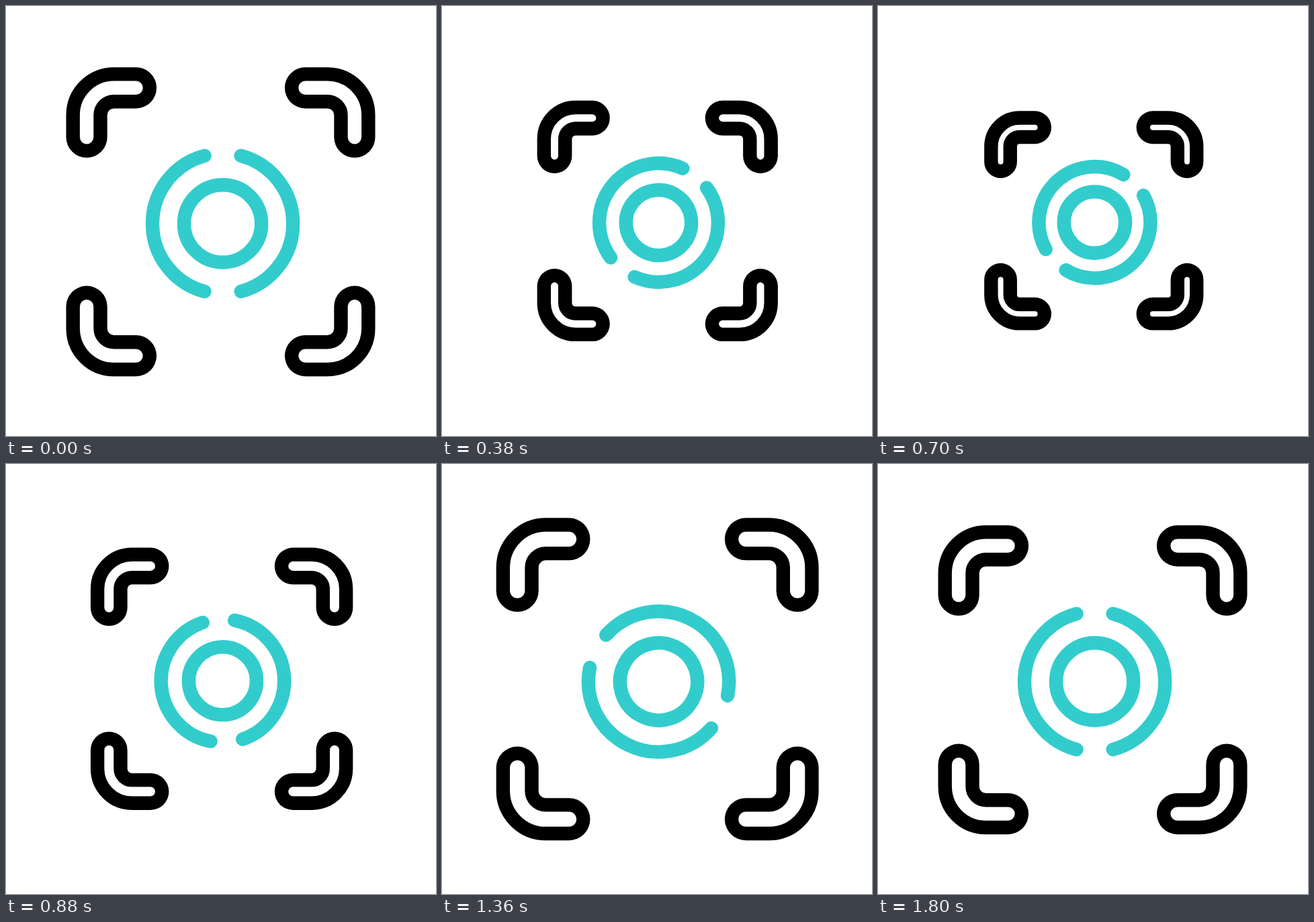
An HTML page that plays this animation: 640x640 px, repeating every 2.02 s.

```html
<!DOCTYPE html>
<html lang="en">
<head>
<meta charset="utf-8">
<title>Focus</title>
<style>
  html, body { margin: 0; width: 100%; height: 100%; overflow: hidden; background: #fff; }
  svg { display: block; width: 100%; height: 100%; }
  path, circle { fill: none; stroke-linecap: round; }
  #edge { stroke: #000; }
  #core { stroke: #fff; }
  #lens { stroke: #33cccc; stroke-width: 20.4; }
</style>
</head>
<body>
<svg viewBox="0 0 640 640">
  <path id="edge"/>
  <path id="core"/>
  <g id="lens">
    <circle id="ring"/>
    <path id="arcs"/>
  </g>
</svg>
<script>
const LOOP = 2020, STEP = 20, PHASE = 600, LINE = 20.4;

// Poses at 0, 600, 1200 and 1800 ms, eased in and out between them
const KEYS = {
  frame:  [1, 0.667, 1.055, 1],
  frameX: [319.5, 321.3, 320.9, 319.5],
  frameY: [321.2, 319.45, 320.1, 321.2],
  lens:   [1, 0.777, 1, 1],
  lensX:  [322.6, 322.4, 322.5, 322.6],
  lensY:  [323.9, 321.9, 323.9, 323.9],
  turn:   [0, 56, -77, 0]
};

const el = id => document.getElementById(id);
const set = (id, attrs) => {
  for (const name in attrs) el(id).setAttribute(name, attrs[name]);
};

function valueAt(keys, t) {
  const i = Math.min(Math.floor(t / PHASE), 2);
  const u = Math.min(t / PHASE - i, 1);
  return keys[i] + (keys[i + 1] - keys[i]) * u * u * (3 - 2 * u);
}

// Centre line of one bracket; sx and sy pick the corner
function bracket(cx, cy, scale, sx, sy) {
  const pt = (x, y) => `${cx + sx * x * scale} ${cy + sy * y * scale}`;
  const side = 199.4, tip = 126, r = 40.5;
  const sweep = sx * sy > 0 ? 0 : 1;
  return `M${pt(tip, side)}L${pt(side - r, side)}` +
    `A${r * scale} ${r * scale} 0 0 ${sweep} ${pt(side, side - r)}L${pt(side, tip)}`;
}

// Half circle with a 15 degree gap at either end
function arc(r, side) {
  const a = Math.PI / 12;
  const x = side * r * Math.sin(a), y = r * Math.cos(a);
  return `M${x} ${-y}A${r} ${r} 0 0 ${side > 0 ? 1 : 0} ${x} ${y}`;
}

function draw(t) {
  const p = {};
  for (const name in KEYS) p[name] = valueAt(KEYS[name], t);

  const d = [[-1, -1], [1, -1], [-1, 1], [1, 1]]
    .map(([sx, sy]) => bracket(p.frameX, p.frameY, p.frame, sx, sy)).join("");
  const band = 40.8 * p.frame;
  set("edge", { d, "stroke-width": band + LINE });
  set("core", { d, "stroke-width": band - LINE });

  const r = 104.6 * p.lens;
  set("ring", { r: 57.6 * p.lens });
  set("arcs", { d: arc(r, -1) + arc(r, 1) });
  set("lens", { transform: `translate(${p.lensX} ${p.lensY}) rotate(${p.turn})` });
}

const start = performance.now();
function tick() {
  const t = (performance.now() - start) % LOOP;
  draw(Math.floor(t / STEP) * STEP);
  requestAnimationFrame(tick);
}
tick();
</script>
</body>
</html>
```
